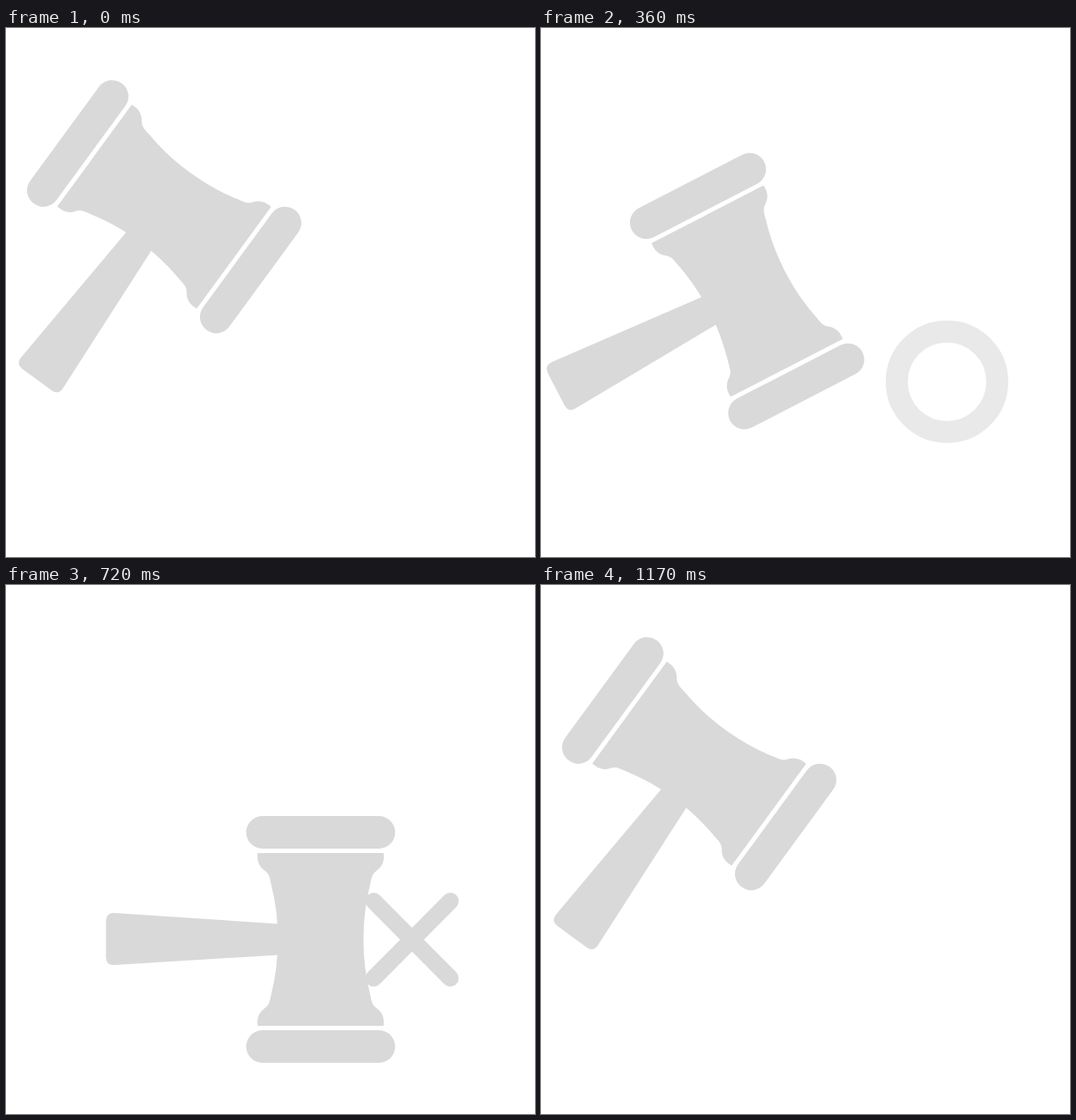
Recreate the animation shown at these times as an HTML page. Size 600 by 600 pixels, loop 1.24 s.

```html
<!DOCTYPE html>
<html lang="en">
<head>
<meta charset="utf-8">
<title>Gavel</title>
<style>
  html, body { margin: 0; height: 100%; overflow: hidden; background: #fff; }
  svg { display: block; width: 100vw; height: 100vh; }
</style>
</head>
<body>
<svg viewBox="0 0 600 600" fill="#d9d9d9" stroke="#d9d9d9" stroke-width="0" stroke-linecap="round">
  <circle id="ring" cx="460.5" cy="401.2" r="57" fill="none" stroke-width="25"/>
  <path id="cross" d="M417 358.5l87 87.5m0-87.5l-87 87.5" fill="none" stroke-width="19"/>
  <g id="gavel">
    <path d="M-66-121.5H66M-66 121.5H66" stroke-width="37"/>
    <path id="half" d="M-1-98H71.5C72.5-89 70-83 64-78.5S58-71 56-62C46-22 46 22 56 62C58 71 58 74 64 78.5S72.5 89 71.5 98H-1Z"/>
    <use href="#half" transform="scale(-1 1)"/>
    <path d="M-46-17.5L-234-30Q-243-30.5-243.5-21V20Q-243.5 29.5-234 29L-46 17.5Z"/>
  </g>
</svg>
<script>
const FRAME = 30, SWING = 600, LOOP = 1240;
const [gavel, ring, cross] = ['gavel', 'ring', 'cross'].map(id => document.getElementById(id));
const clamp = v => Math.min(Math.max(v, 0), 1);

// Fast drop, short rest at the bottom, slow rise; the lunge pushes sideways around the hit.
function moveGavel(t) {
  const lift = clamp(Math.max(1 - t / 94, (t - 148) / 418));
  const lunge = clamp(1 - Math.abs(t - 120) / 110);
  const x = 229.9 - 80 * lift + 77 * lunge;
  const y = 402 - 159 * lift;
  gavel.setAttribute('transform', `translate(${x} ${y}) rotate(${-53.8 * lift}) translate(50 0)`);
}

function fade(t, rise) {
  return t > 540 ? 0 : clamp(Math.min((t - 90) / rise, 1.25 - 0.0019 * t));
}

function draw(now) {
  const time = Math.min(Math.floor(now % LOOP / FRAME) * FRAME, 2 * SWING - FRAME);
  const t = time % SWING, first = time < SWING;
  moveGavel(t);
  ring.setAttribute('opacity', first ? fade(t, 90) : 0);
  cross.setAttribute('opacity', first ? 0 : fade(t, 30));
}

const start = performance.now();
function tick() {
  draw(performance.now() - start);
  requestAnimationFrame(tick);
}
tick();
</script>
</body>
</html>
```
